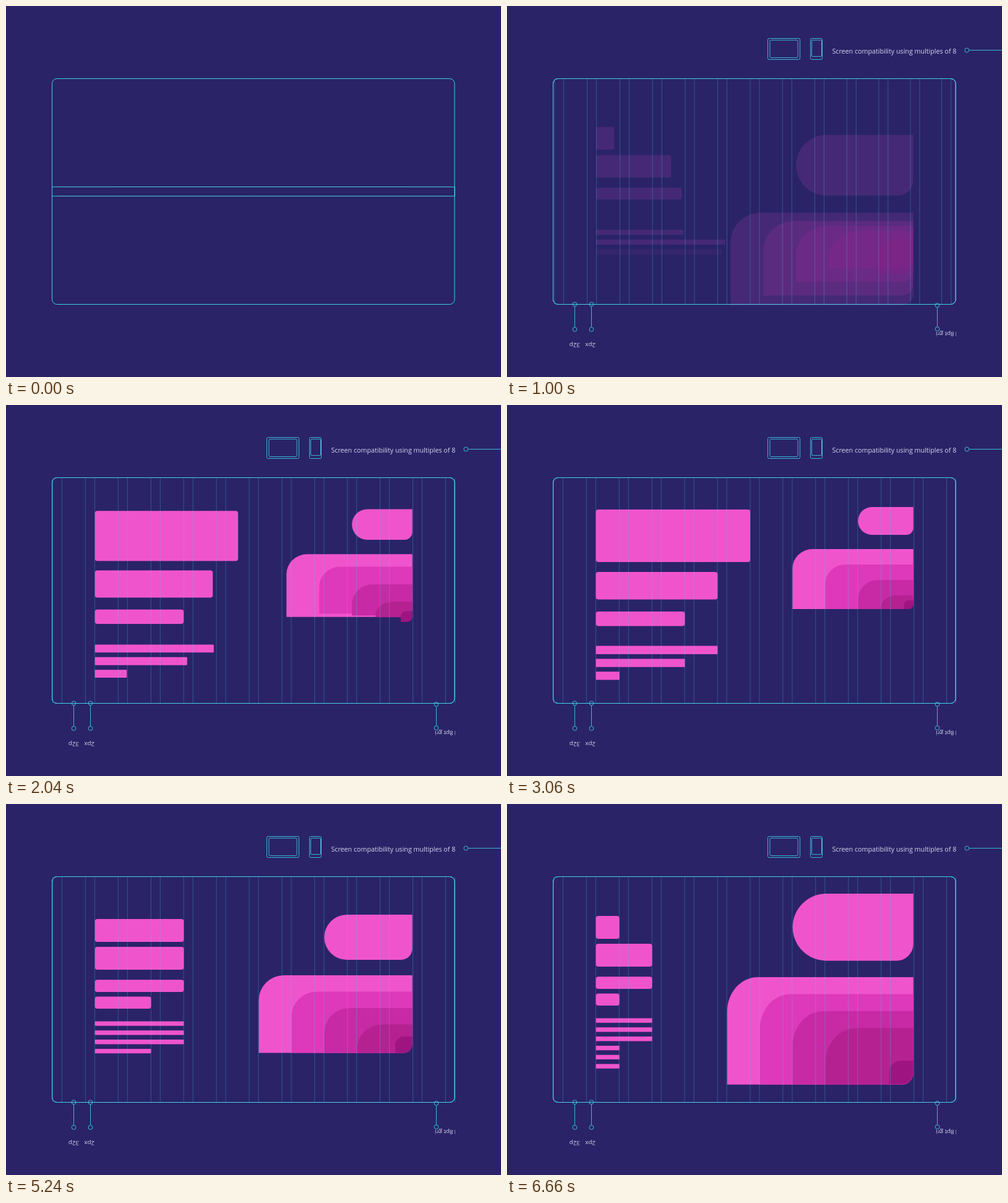
An HTML page with a canvas for the animation above (7380 ms loop, 800 by 600 pixels).

```html
<!DOCTYPE html>
<html lang="en">
<head>
<meta charset="utf-8">
<title>8pt grid</title>
<style>
  html, body { margin: 0; width: 100%; height: 100%; overflow: hidden; background: #2a2368; }
  canvas { display: block; }
</style>
</head>
<body>
<canvas id="stage" width="800" height="600"></canvas>
<script>
const ctx = document.getElementById('stage').getContext('2d');
const LOOP = 7380;
const BG = '#2a2368', CYAN = '#42d0ea', PINK = '#f054cd', INK = '#d8d6ea';
const CARD_FILLS = [PINK, '#de39ba', '#c72aa4', '#b62192', '#9e1581'];
const COLUMN = 52.92, GUTTER = 15, LEFT = 143.7, RIGHT = 656.7;
const STARTS = [960, 3060, 5240];

const clamp = v => Math.min(1, Math.max(0, v));
const mix = (a, b, p) => a + (b - a) * p;
const quadOut = x => 1 - (1 - clamp(x)) ** 2;
const expoOut = x => x >= 1 ? 1 : 1 - 2 ** (-10 * Math.max(0, x));
const backOut = x => { const u = clamp(x) - 1; return 1 + 3 * u ** 3 + 2 * u * u; };
const span = columns => columns * COLUMN - GUTTER;

// heads and text give the width of each row in grid columns.
const opening = {
  top: 197, title: 34, gap: 8.5, name: 36, para: 50, line: 8, heads: [0.6, 2.5, 2.9], text: [2.9, 4.3],
  columns: 6, pillY: 211, pillH: 101, cardY: 340, cardH: 153, step: 8, shrink: 30, lastY: 377, lastSize: 60
};
const desktop = {
  top: 169, title: 85, gap: 16, name: 44.5, para: 32, line: 13.3, heads: [5, 4, 3], text: [4, 3, 1],
  columns: 4, pillY: 165, pillH: 45, cardY: 233, cardH: 97, step: 25, lastY: 316, lastSize: 14
};
const tablet = {
  top: 186, title: 37, gap: 8, name: 37, para: 20.5, line: 7.3, heads: [3, 3, 3, 2], text: [3, 3, 3, 2],
  columns: 5, pillY: 179, pillH: 73, cardY: 277, cardH: 125.5, step: 26.5, lastY: 376, lastSize: 26.5
};
const phone = {
  ...tablet, top: 181, heads: [1, 2, 2, 1], text: [2, 2, 2, 1, 1, 1],
  columns: 6, pillY: 145, pillH: 108.5, cardY: 280, cardH: 174, step: 27.5, lastY: 416, lastSize: 38
};
const LAYOUTS = [opening, desktop, tablet, phone];

// A row that a layout lacks takes the width of its last one.
function rowBox(layout, group, i) {
  const { top, title, gap, name, para, line, heads } = layout;
  const w = span(layout[group][i] ?? layout[group].at(-1));
  const sub = name * 0.53;
  const nameY = top + title + gap;
  const subY = nameY + name * 1.44;
  const subRow = n => subY + n * (sub + 7.5);
  if (group === 'text') {
    const textY = subRow(heads.length - 3) + sub + para;
    return { w, y: textY + i * (line + 7.5), h: line };
  }
  if (i === 0) return { w, y: top, h: title };
  if (i === 1) return { w, y: nameY, h: name };
  return { w, y: subRow(i - 2), h: sub };
}

function cardBox({ columns, cardY, cardH, step, shrink = step, lastY, lastSize }, i) {
  if (i === 4) return { w: lastSize + 1, y: lastY, h: lastSize };
  return { w: span(Math.max(columns - i, 1.3)) - 1.5, y: cardY + i * step, h: cardH - i * shrink };
}

const pillBox = ({ columns, pillY, pillH }) => ({ w: span(columns - 2) - 1.5, y: pillY, h: pillH });

const mixBox = (a, b, pw, py, ph) => ({ w: mix(a.w, b.w, pw), y: mix(a.y, b.y, py), h: mix(a.h, b.h, ph) });

function fillRect(x, { y, w, h }, radii) {
  ctx.beginPath();
  ctx.roundRect(x, y, w, h, radii);
  ctx.fill();
}

function strokeRect(x, y, w, h, rx, ry = rx) {
  ctx.beginPath();
  ctx.roundRect(x, y, w, h, { x: rx, y: ry });
  ctx.stroke();
}

function line(x1, y1, x2, y2) {
  ctx.beginPath();
  ctx.moveTo(x1, y1);
  ctx.lineTo(x2, y2);
  ctx.stroke();
}

function ring(x, y) {
  ctx.beginPath();
  ctx.arc(x, y, 3.4, 0, 2 * Math.PI);
  ctx.stroke();
}

function pin(x, top, bottom) {
  ring(x, top);
  ring(x, bottom);
  line(x, top + 3.4, x, bottom - 3.4);
}

function flippedText(str, right, y) {
  ctx.save();
  ctx.translate(right, y);
  ctx.rotate(Math.PI);
  ctx.fillText(str, 0, 0);
  ctx.restore();
}

function drawLabels(t) {
  const fade = clamp(t / 740);
  ctx.globalAlpha = 0.85 * fade;
  strokeRect(421.5, 52.5, 52, 34, 2);
  strokeRect(424.9, 55.2, 45.2, 28.4, 2);
  strokeRect(490.5, 52.5, 19, 34, 2);
  strokeRect(492.5, 55.2, 16, 26.4, 1.5);
  ring(743.3, 71.5);
  line(747, 71.5, 800, 71.5);
  pin(109.5, 482.3, 523);
  pin(136.5, 482.3, 523);
  pin(695.5, 484, 522.3);

  ctx.globalAlpha = fade;
  ctx.fillStyle = INK;
  ctx.font = '10.7px "Open Sans", sans-serif';
  ctx.fillText('Screen compatibility using multiples of 8', 525.5, 77);
  ctx.font = '9.8px "Open Sans", sans-serif';
  flippedText('32p', 118, 544.5);
  flippedText('2px', 143, 544.5);
  flippedText('8pt gri', 722.5, 526.5);
  ctx.globalAlpha = fade / 2;
  ctx.fillRect(725, 527, 1, 7);
}

function drawRows(step, e) {
  const from = LAYOUTS[step], to = LAYOUTS[step + 1];
  const pw = quadOut(e / (step ? 1280 : 1500));
  const py = quadOut(e / (step ? 1000 : 1500));
  ctx.fillStyle = PINK;
  for (const group of ['heads', 'text']) {
    const isHead = group === 'heads';
    to[group].forEach((_, i) => {
      const isNew = i >= from[group].length;
      const fadeTime = isNew ? (isHead ? 1450 : 900) : step ? 0 : 300;
      ctx.globalAlpha = fadeTime ? clamp(e / fadeTime) : 1;
      const box = mixBox(rowBox(from, group, i), rowBox(to, group, i), pw, py, py);
      fillRect(LEFT, box, isHead ? 4 : 1);
    });
  }
}

function drawCards(step, e) {
  const from = LAYOUTS[step], to = LAYOUTS[step + 1];
  const p = quadOut(e / 1500);
  ctx.globalAlpha = step ? 1 : clamp(e / 300);

  const pill = mixBox(pillBox(from), pillBox(to), p, p, p);
  const r = pill.h / 2;
  ctx.fillStyle = PINK;
  fillRect(RIGHT - pill.w, pill, [r, 0, r / 2, r]);

  const base = mixBox(cardBox(from, 0), cardBox(to, 0), p, p, p);
  CARD_FILLS.forEach((fill, i) => {
    const py = i ? quadOut((e - 260 - 100 * i) / 900) : p;
    const box = mixBox(cardBox(from, i), cardBox(to, i), p, py, p);
    const corner = {
      x: Math.min(base.w * 0.165, box.w / 2),
      y: Math.min(base.h * 0.32, box.h * (i < 4 ? 0.85 : 0.5))
    };
    ctx.fillStyle = fill;
    fillRect(RIGHT - box.w, box, [corner, 0, Math.min(base.w * 0.063, box.h / 2), 0]);
  });
}

// Thirteen gutters fan out from the centre, left ones first.
function drawGuides(t) {
  for (let i = 0; i < 13; i++) {
    const e = t - 200 - 22.4 * i;
    const x = 393 + (i - 6) * COLUMN * expoOut(e / 1000);
    ctx.globalAlpha = 0.3 * clamp(e / 80);
    line(x, 118, x, 482);
    line(x + GUTTER, 118, x + GUTTER, 482);
  }
}

function drawFrame(t) {
  const scale = mix(0.041, 1, backOut((t - 20) / 500));
  const h = 365 * scale;
  ctx.globalAlpha = 1;
  strokeRect(74.5, 117.5, 650.5, 365, 8);
  strokeRect(74.5, 300 - h / 2, 650.8, h, 8, 8 * scale);
}

function draw(t) {
  ctx.globalAlpha = 1;
  ctx.fillStyle = BG;
  ctx.fillRect(0, 0, 800, 600);
  ctx.strokeStyle = CYAN;
  drawLabels(t);
  const step = STARTS.filter(start => t >= start).length - 1;
  if (step >= 0) {
    drawRows(step, t - STARTS[step]);
    drawCards(step, t - STARTS[step]);
  }
  drawGuides(t);
  drawFrame(t);
}

const begin = performance.now();
function tick() {
  draw((performance.now() - begin) % LOOP);
  requestAnimationFrame(tick);
}
tick();
</script>
</body>
</html>
```
